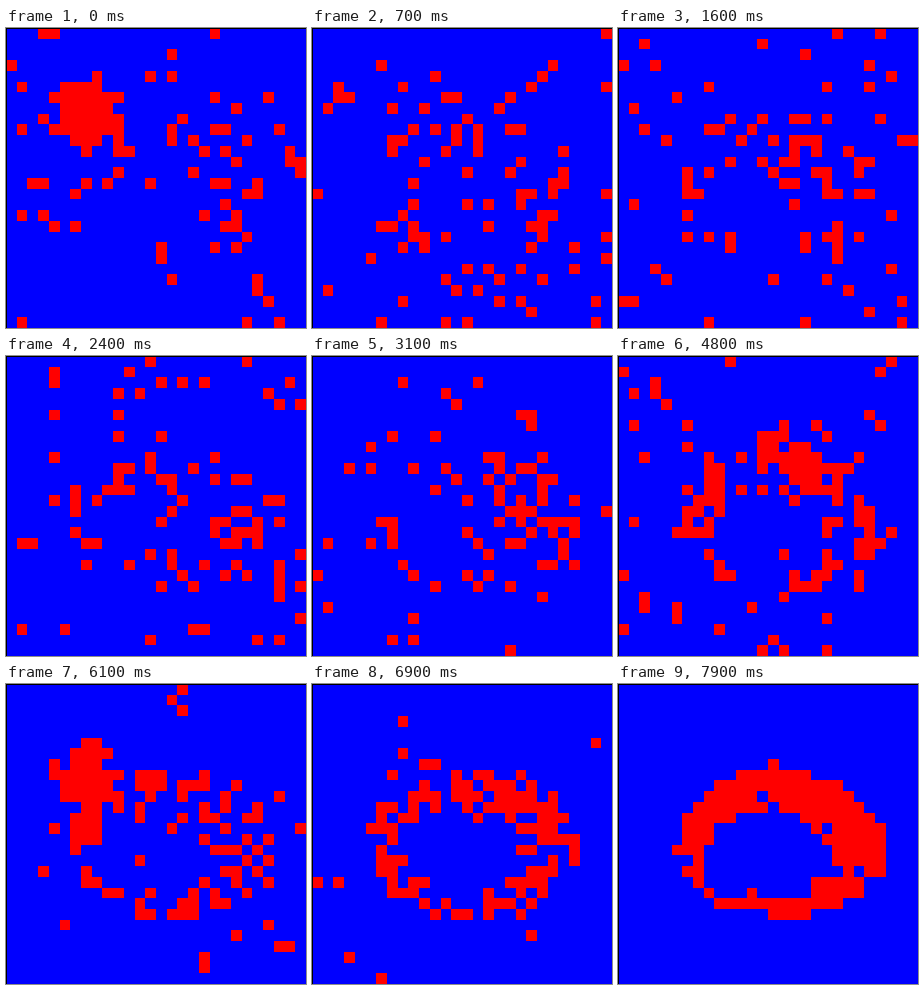
Write a matplotlib script that moves like this. It is 300 px wide and 300 px high and loops after 8000 ms.

```python
import numpy as np
import matplotlib.pyplot as plt
from matplotlib.animation import FuncAnimation

SIZE, CELLS = 300, 28
FRAMES, STEP = 80, 100
BLUE, RED, BLACK = (0, 0, 255), (255, 0, 0), (0, 0, 0)
CALM = 7300  # ms until the background noise has died out

# wandering cluster: time in ms, column, row, strength
TIME, COL, ROW, POWER = zip(
    (0, 6.8, 8, 0.95), (700, 13, 8, 0.3), (2400, 15, 14, 0.15),
    (3700, 21.5, 17.5, 0.75), (4800, 18, 10, 0.75),
    (6100, 6.8, 8, 0.95), (CALM, 9, 10, 0))

yy, xx = np.mgrid[:CELLS, :CELLS]


def soft(depth, width):
    """Step from 0 to 1 where depth turns positive."""
    return 1 / (1 + np.exp(-depth / width))


def ring(settled):
    """An oval loop, heavy at the top and right, that sharpens as it settles."""
    u, v = (xx - 14) / 7.8, (yy - 15) / 5.5
    angle = np.arctan2(v, u)
    half = 1.5 + 0.8 * np.cos(angle + 0.8)
    off = np.abs(np.hypot(u, v) - 1) * 6
    blur = 0.8 - 0.6 * settled
    return (0.3 + 0.65 * settled ** 3) * soft(half - off, blur)


def cluster(t):
    x, y, power = (np.interp(t, TIME, values) for values in (COL, ROW, POWER))
    return power * soft(3.4 - np.hypot(xx - x, yy - y), 0.4)


def cells(i):
    t = i * STEP
    noise = 0.06 * max(0, 1 - (t / CALM) ** 4)
    chance = np.maximum(ring(i / (FRAMES - 1)), cluster(t))
    chance = np.where(chance < 0.02, 0, chance)
    rng = np.random.default_rng([28, i])
    return rng.random(chance.shape) < np.maximum(chance, noise)


pick = ((np.arange(SIZE) + 0.5) * CELLS / SIZE).astype(int)


def picture(i):
    on = cells(i)[np.ix_(pick, pick)]
    img = np.where(on[..., None], RED, BLUE).astype(np.uint8)
    img[0] = BLACK
    img[:, 0] = BLACK
    return img


fig = plt.figure(figsize=(3, 3), dpi=100)
ax = fig.add_axes([0, 0, 1, 1])
ax.axis("off")
view = ax.imshow(picture(0), interpolation="nearest", aspect="auto")


def update(i):
    view.set_data(picture(i))
    return [view]


anim = FuncAnimation(fig, update, frames=FRAMES, interval=STEP,
                     repeat=True, repeat_delay=0, blit=False)
plt.show()
```
